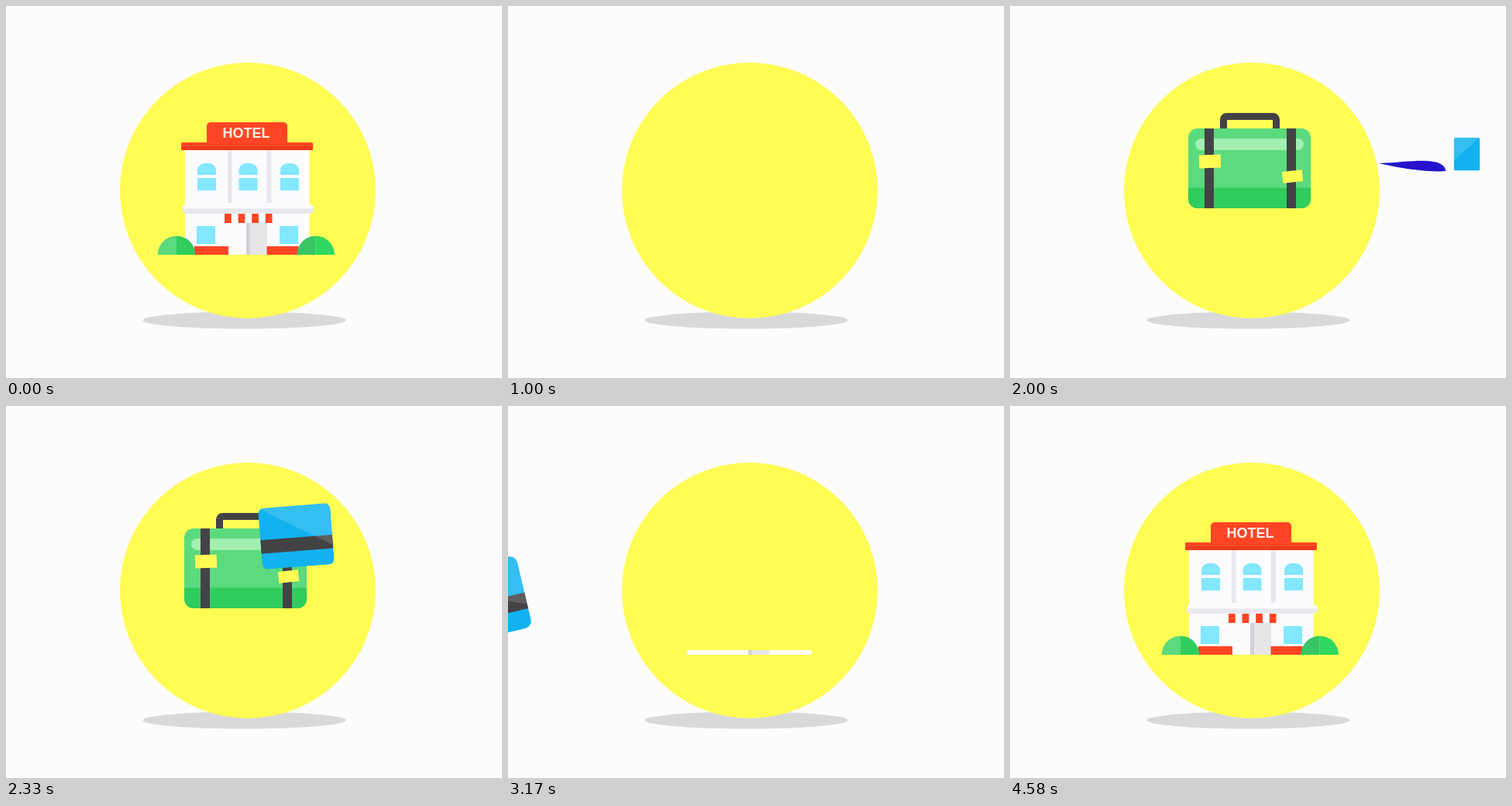
Write an HTML page with a canvas that moves like this. It is 640 px wide and 480 px high and loops after 4660 ms.

```html
<!DOCTYPE html>
<html lang="en">
<head>
<meta charset="utf-8">
<title>Travel loop</title>
<style>
html, body { margin: 0; width: 100%; height: 100%; overflow: hidden; background: #fcfcff; }
canvas { display: block; }
</style>
</head>
<body>
<canvas id="stage" width="640" height="480"></canvas>
<script>
const c = document.getElementById('stage').getContext('2d');
const LOOP = 4660, FPS = 12;
const WHITE = '#fcfcff', YELLOW = '#fffc54', RED = '#ff4524', GREY = '#e8e8ec',
      GLASS = '#82e7ff', DARK = '#434345', LEAF = '#5cda7e', GRASS = '#30cc5e';
const DISC = { x: 312, y: 238, r: 165 };

// 0..1 progress between two times
const ramp = (t, a, b) => Math.min(1, Math.max(0, (t - a) / (b - a)));
const out = p => 1 - (1 - p) ** 2;
const back = p => 1 + 2.2 * (p - 1) ** 3 + 1.2 * (p - 1) ** 2;

function box(x, y, w, h, color, r = 0) {
  c.fillStyle = color;
  c.beginPath();
  c.roundRect(x, y, w, h, r);
  c.fill();
}

function disc(r, color) {
  c.fillStyle = color;
  c.beginPath();
  c.arc(DISC.x, DISC.y, r, 0, 7);
  c.fill();
}

// draw inside a moved, turned and scaled frame
function at(x, y, deg, sx, sy, draw) {
  c.save();
  c.translate(x, y);
  c.rotate(deg * Math.PI / 180);
  c.scale(sx, sy);
  draw();
  c.restore();
}

function clipped(path, draw) {
  c.save();
  c.beginPath();
  path();
  c.clip();
  draw();
  c.restore();
}

function bush(x, size, ...colors) {
  at(x, 321, 0, size, size, () => colors.forEach((color, i) => {
    c.fillStyle = color;
    c.beginPath();
    c.moveTo(0, 0);
    c.arc(0, 0, 24.3, (1 + i / 2) * Math.PI, (1.5 + i / 2) * Math.PI);
    c.fill();
  }));
}

// windows slide down into place while fading in
function pane(x, y, p, draw) {
  c.save();
  c.globalAlpha = Math.min(1, 2 * p);
  c.translate(x, y - 18 * (1 - p));
  draw();
  c.restore();
}

function sign(p) {
  const y = 150 + 28 * (1 - back(p));
  clipped(() => c.rect(220, 60, 180, 122), () => {
    box(259, y, 104, 40, RED, 5);
    c.fillStyle = '#fff4ee';
    c.font = 'bold 18px "Liberation Sans", Arial, sans-serif';
    c.textAlign = 'center';
    c.fillText('HOTEL', 310, y + 20);
  });
}

function walls(top) {
  clipped(() => c.rect(190, top, 240, 321 - top), () => {
    box(231, 186, 160.5, 135, WHITE);
    box(286, 186, 5.5, 68, GREY);
    box(336.5, 186, 6, 68, GREY);
    box(228, 256, 169, 12, WHITE, 5);
    box(228, 261.5, 169, 6.5, GREY, [0, 0, 5, 5]);
    box(310, 280, 27, 41, '#e6e6e8');
    box(310, 280, 5, 41, '#d2d2d6');
  });
}

function hotel(t) {
  if (t > 3600) sign(ramp(t, 3667, 3917));
  walls(321 - 65 * ramp(t, 3150, 3333) - 70 * ramp(t, 3333, 3583));

  const roof = 10 * ramp(t, 3500, 3833);
  box(226, 186 - roof, 170, roof, RED, 1.5);
  box(227, 186 - roof / 2, 168, roof / 2, '#ee3a1c', 1.5);

  for (let i = 0; i < 3; i++) {
    pane(259 + 53.5 * i, 220, ramp(t, 3817 - 83 * i, 4000 - 83 * i), () => {
      box(-12, -17, 24, 15, GLASS, [9, 9, 0, 0]);
      box(-12, 2, 24, 16, GLASS);
    });
  }
  for (const x of [258, 365]) {
    pane(x, 295.5, ramp(t, 3583, 3750), () => box(-12, -11.5, 24, 23, GLASS));
  }

  for (let i = 0; i < 4; i++) {
    const p = ramp(t, 3292 + 83 * i, 3542 + 83 * i);
    box(282 + 17.6 * i, 268 + 5 * (1 - p), 8.7, 12 * Math.min(1, 2 * p), RED);
  }

  const base = 11 * out(ramp(t, 3250, 3450));
  box(243, 321 - base, 44, base, RED);
  box(336.5, 321 - base, 41, base, RED);

  const size = Math.max(0, back(ramp(t, 3250, 3540)));
  bush(220, size, LEAF, GRASS);
  bush(399.7, size, '#38c566', '#30d860');
}

// drops in, rests, then tips over and falls out
function suitcase(t) {
  const land = back(ramp(t, 1333, 1750));
  const fall = Math.max(0, t - 2417) / 333;
  at(309 - 3 * fall, 209.5 - 205 * (1 - land) + 190 * fall ** 2, 8.3 * fall, 1, 1, () => {
    c.strokeStyle = DARK;
    c.lineWidth = 9;
    c.beginPath();
    c.roundRect(-33.5, -67, 68, 40, 4);
    c.stroke();
    clipped(() => c.roundRect(-79, -51.5, 158, 103, 12), () => {
      box(-79, -52, 158, 104, LEAF);
      box(-79, 25, 158, 27, GRASS);
      box(-70, -38.5, 140, 15, '#a2f0b2', 7.5);
      box(-58, -52, 12, 104, DARK);
      box(48, -52, 12, 104, DARK);
    });
    at(-51, -9, -2, 1, 1, () => box(-14, -8.5, 28, 17, YELLOW));
    at(55.5, 10.5, -6, 1, 1, () => box(-13, -7.5, 26, 15, YELLOW));
  });
}

// arcs in from the right while flipping open, then speeds off to the left
function card(t) {
  const p = ramp(t, 2000, 2750), grow = out(p);
  const exit = Math.max(0, t - 2750) / 250;
  const x = 589.5 - 311 * grow - 119 * exit ** 2;
  const y = 191 + 71.5 * p - 100 * (1 - p) * Math.sin(Math.PI * p) - 4 * exit;
  const flip = 1.225 * grow - .225;
  at(x, y, -10 * p - 2 * exit, flip, .45 + .55 * grow, () => {
    clipped(() => c.roundRect(-75, -47.5, 150, 95, 10), () => {
      box(-75, -48, 150, 96, '#12b2f0');
      if (flip > 0) box(-75, 2, 150, 21, DARK);
      c.fillStyle = 'rgba(255,255,255,.15)';
      c.beginPath();
      c.moveTo(-75, -48);
      c.lineTo(75, -48);
      c.lineTo(75, 18);
      c.fill();
    });
  });
}

// short trail between the disc and the card
function swoosh(t) {
  const size = 1 - ramp(t, 2000, 2150);
  at(562, 213, 0, size, size, () => {
    c.fillStyle = '#2412cc';
    c.beginPath();
    c.moveTo(-86, -10);
    c.bezierCurveTo(-55, -11, -30, -16, -10, -11);
    c.quadraticCurveTo(0, -7, 0, 0);
    c.quadraticCurveTo(-20, 2, -62, -5);
    c.fill();
  });
}

// a red wave spreads behind the hotel, a yellow one wipes both away
function wipe(t) {
  disc(164.5 * ramp(t, 333, 647), '#dc391c');
  hotel(LOOP);
  disc(DISC.r * ramp(t, 667, 1000), YELLOW);
}

function scene(t) {
  c.fillStyle = WHITE;
  c.fillRect(0, 0, 640, 480);
  c.fillStyle = '#d9d9d9';
  c.beginPath();
  c.ellipse(307.5, 405.5, 131, 11, 0, 0, 7);
  c.fill();
  disc(DISC.r, YELLOW);

  clipped(() => c.arc(DISC.x, DISC.y, DISC.r, 0, 7), () => {
    if (t < 1000) wipe(t);
    if (t > 1333 && t < 2950) suitcase(t);
    if (t > 3150) hotel(t);
  });

  if (t >= 2000 && t < 3300) {
    swoosh(t);
    card(t);
  }
}

// motion is stepped at twelve poses a second, on a 10 ms grid
function tick() {
  const slot = Math.floor(performance.now() % LOOP / 10);
  const pose = Math.ceil((slot + 1) * FPS / 100 - 1e-6) - 1;
  scene(pose * 1000 / FPS);
  requestAnimationFrame(tick);
}
tick();
</script>
</body>
</html>
```
